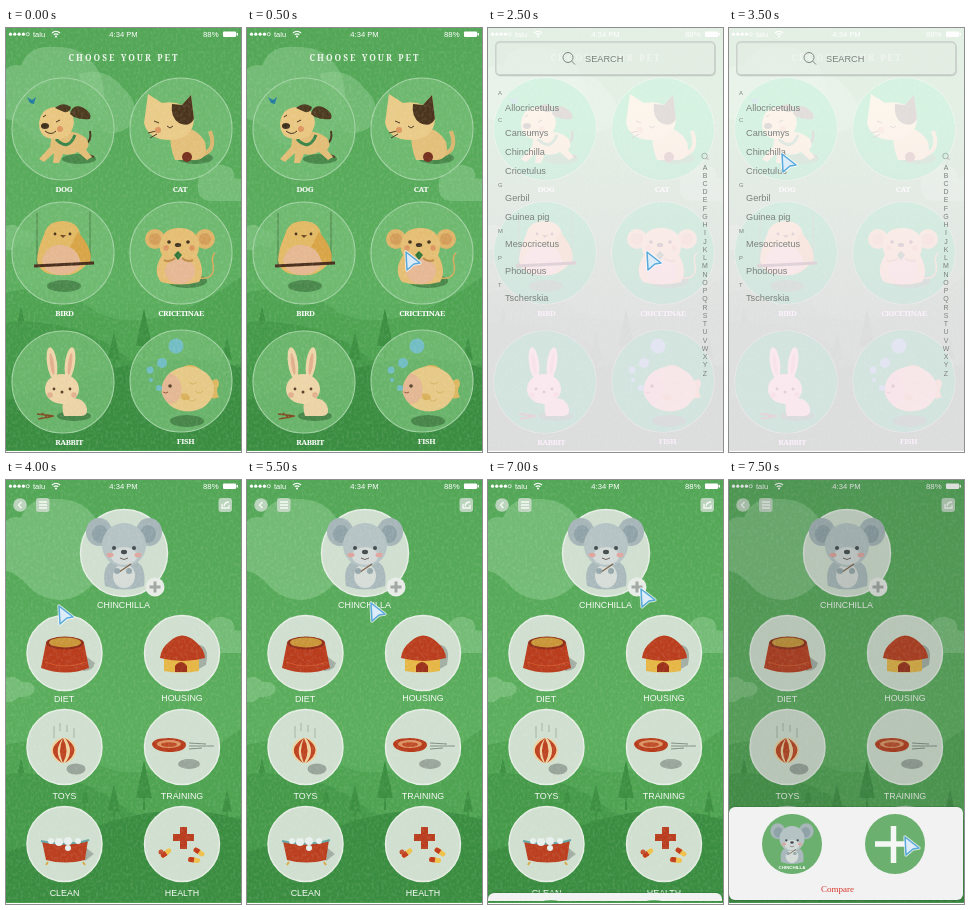
These frames come from a looping animation (235x424 px, 8000 ms). An HTML page:

```html
<!DOCTYPE html>
<html lang="en">
<head>
<meta charset="utf-8">
<title>Pet app</title>
<style>
html, body { margin: 0; width: 100%; height: 100%; overflow: hidden; background: #fff; }
svg { display: block; width: 100%; height: 100%; }
text { font-family: "Liberation Sans", sans-serif; }
.mid text, text.mid { text-anchor: middle; }
.slab text { font-family: "Noto Serif", serif; font-size: 7.8px; font-weight: 700; letter-spacing: -.4px; fill: #fff; }
.slab .title { font-size: 8.4px; letter-spacing: 2px; fill: #eef7ec; }
.caps text { font-size: 8.9px; fill: #f6faf5; }
.bubble { fill: #74bd75; fill-opacity: .8; stroke: #a3d3a4; stroke-width: 1.1; }
.tint { fill: #00b84a; }
.plate circle { fill: #d0dfcf; stroke: #e6eee5; stroke-width: 1.5; }
.shade ellipse { fill: #3a733b; opacity: .7; }

.pets, .care, .list, .tint, .sheet, .dim, .cursor { animation: 8s step-end infinite; }
.pets { animation-name: pets; }
.care { animation-name: care; }
.list { animation-name: list; }
.tint { animation-name: tint; }
.sheet { animation-name: sheet; }
.dim { animation-name: dim; }
.cursor { animation-name: cursor; }
@keyframes pets { 0% { visibility: visible } 50%, 100% { visibility: hidden } }
@keyframes care { 0% { visibility: hidden } 50%, 100% { visibility: visible } }
@keyframes tint { 0% { visibility: hidden } 12.5% { visibility: visible } 50%, 100% { visibility: hidden } }
@keyframes list {
  0% { visibility: hidden; transform: translateY(5px) }
  12.5% { visibility: visible; transform: translateY(5px) }
  31.25% { visibility: visible; transform: none }
  50%, 100% { visibility: hidden; transform: none }
}
@keyframes sheet {
  0% { visibility: hidden; transform: translateY(86px) }
  87.5% { visibility: visible; transform: translateY(86px) }
  93.75%, 100% { visibility: visible; transform: none }
}
@keyframes dim { 0% { visibility: hidden } 93.75%, 100% { visibility: visible } }
@keyframes cursor {
  0% { visibility: hidden; transform: translate(157px, 222px) }
  6.25% { visibility: visible; transform: translate(157px, 222px) }
  37.5% { visibility: visible; transform: translate(54px, 128px) }
  43.75% { visibility: visible; transform: translate(51px, 124px) }
  68.75% { visibility: visible; transform: translate(122px, 121px) }
  75% { visibility: visible; transform: translate(152px, 108px) }
  81.25% { visibility: visible; transform: translate(151px, 107px) }
  93.75%, 100% { visibility: visible; transform: translate(174px, 355px) }
}
</style>
</head>
<body>
<svg viewBox="0 0 235 424" preserveAspectRatio="none">
<defs>
  <linearGradient id="sky" x2="0" y2="1">
    <stop stop-color="#52a656"/><stop offset=".6" stop-color="#5bae5d"/><stop offset="1" stop-color="#4da353"/>
  </linearGradient>
  <linearGradient id="veil" x2="0" y2="1">
    <stop offset=".2" stop-color="#fffdff"/><stop offset=".7" stop-color="#fbecfb"/>
  </linearGradient>
  <filter id="grain" x="0" y="0" width="1" height="1">
    <feTurbulence type="fractalNoise" baseFrequency=".4 .3" numOctaves="2" seed="4"/>
    <feColorMatrix values="0 0 0 0 1  0 0 0 0 1  0 0 0 0 1  1.6 0 0 0 -.65"/>
  </filter>
  <clipPath id="screen"><rect width="235" height="422.500"/></clipPath>
  <path id="tree" d="M0 0L8 38H1V50H-1V38H-8Z"/>
  <g id="rings">
    <circle cx="57" cy="101" r="51"/><circle cx="175" cy="101" r="51"/>
    <circle cx="57" cy="225" r="51"/><circle cx="175" cy="225" r="51"/>
    <circle cx="57" cy="354" r="51"/><circle cx="175" cy="353" r="51"/>
  </g>
  <g id="lens" fill="none" stroke="#7d847f"><circle r="5"/><path d="M3.6 3.6L7 7"/></g>
  <g id="pill">
    <rect x="-6" y="-2.5" width="12" height="5" rx="2.5" fill="#efc04a"/>
    <path d="M0-2.5H-3.5A2.5 2.5 0 0 0-3.5 2.5H0Z" fill="#c03b1c"/>
  </g>
  <g id="chin">
    <path d="M-19 35Q-23 12-8 9H9Q23 13 20 35Q0 42-19 35Z" fill="#a9b9bb"/>
    <ellipse cy="25" rx="11" ry="12" fill="#d6dcd8"/>
    <ellipse cx="-25" cy="-19" rx="13" ry="14" fill="#a5b5b8"/>
    <ellipse cx="25" cy="-19" rx="13" ry="14" fill="#a5b5b8"/>
    <ellipse cx="-24" cy="-17" rx="8" ry="9" fill="#8fa2a7"/>
    <ellipse cx="24" cy="-17" rx="8" ry="9" fill="#8fa2a7"/>
    <ellipse cy="-6" rx="22" ry="22" fill="#b5c3c4"/>
    <ellipse cy="5" rx="13" ry="9" fill="#d3dad7"/>
    <g fill="#424a4d"><circle cx="-10" cy="-3" r="2"/><circle cx="10" cy="-3" r="2"/><ellipse cy="1" rx="3" ry="2.2"/></g>
    <g fill="#dfa49d"><ellipse cx="-14" cy="4" rx="3.5" ry="2.2"/><ellipse cx="14" cy="4" rx="3.5" ry="2.2"/></g>
    <path d="M-4 7Q0 10 4 7" fill="none" stroke="#6d6260"/>
    <path d="M-5 21L7 13" stroke="#7c6146" stroke-width="1.4"/>
    <circle cx="-7" cy="20" r="3" fill="#96a8ac"/><circle cx="5" cy="20" r="3" fill="#96a8ac"/>
  </g>
</defs>

<g clip-path="url(#screen)">
  <rect width="235" height="424" fill="url(#sky)"/>
  <g fill="#8ccb8e" opacity=".55">
    <path d="M0 41Q7 35 15 38Q22 16 50 19Q80 18 94 46Q108 90 78 112Q50 130 24 108Q10 92 0 91Z"/>
    <path d="M0 198Q10 195 15 202Q27 200 29 209Q27 218 13 217Q7 223 0 222Z"/>
    <path d="M192 159Q190 147 200 147Q207 133 220 138Q229 140 228 150L235 151V173H203Q191 171 192 159Z"/>
  </g>
  <path d="M0 265Q48 252 92 285Q150 310 235 249V424H0Z" fill="#4ea351"/>
  <path d="M0 294Q70 290 120 328T235 335V424H0Z" fill="#449948"/>
  <g fill="#3c8f41">
    <use href="#tree" x="138" y="280"/>
    <use href="#tree" transform="translate(108 303) scale(.75)"/>
    <use href="#tree" transform="translate(221 309) scale(.6)"/>
    <use href="#tree" transform="translate(15 278) scale(.4)"/>
    <use href="#tree" transform="translate(79 307) scale(.42)"/>
  </g>
  <path d="M0 372Q55 355 95 345Q170 319 235 340V424H0Z" fill="#3a8d40"/>

  <g class="pets">
    <path d="M72 46Q100 38 117 60Q137 77 123 99Q110 108 96 104Z" fill="#8ccb8e" opacity=".5"/>
    <use class="bubble" href="#rings"/>
    <use class="tint" href="#rings"/>
    <g class="shade">
      <ellipse cx="73" cy="131" rx="17" ry="5"/><ellipse cx="189" cy="130" rx="18" ry="6"/>
      <ellipse cx="58" cy="258" rx="17" ry="6"/><ellipse cx="181" cy="253" rx="20" ry="7"/>
      <ellipse cx="68" cy="388" rx="17" ry="5"/><ellipse cx="181" cy="393" rx="17" ry="6"/>
    </g>

    <!-- dog -->
    <path d="M79 116Q86 113 84 103M80 126l8 3" fill="none" stroke="#4b3a20" stroke-width="2"/>
    <path d="M46 106Q66 99 80 110Q85 117 80 122L86 129L81 132L72 124Q65 128 57 126L53 135H47L48 125L38 134L33 131L44 119Z" fill="#e2bd76"/>
    <path d="M50 111Q62 124 69 107" fill="none" stroke="#398549" stroke-width="3"/>
    <path d="M33 95Q35 79 51 79Q67 79 68 95Q65 112 49 111Q33 111 33 95Z" fill="#e9c781"/>
    <path d="M49 80Q57 73 65 79Q64 85 58 84ZM64 86Q66 76 76 79Q87 85 84 91Q75 92 68 89Z" fill="#4c3a1f"/>
    <ellipse cx="39" cy="98" rx="4" ry="3" fill="#3f301e"/>
    <path d="M39 103Q45 108 50 103M50 94l4-2M37 89l3-2" fill="none" stroke="#3f301e"/>
    <circle cx="54" cy="101" r="3" fill="#dd965f"/>
    <path d="M21 69l5 3 4-3-2 7-4-1Z" fill="#247c9f"/>

    <!-- cat -->
    <path d="M192 127Q212 125 204 103" fill="none" stroke="#dcb66f" stroke-width="4"/>
    <path d="M164 103Q188 94 199 114Q203 131 190 132H169Q164 121 164 103Z" fill="#e3bf79"/>
    <path d="M138 95L142 66L156 75Q168 73 176 77L185 67L188 91Q187 111 164 112Q142 112 138 95Z" fill="#eacb88"/>
    <path d="M166 76L176 77L185 67L188 91Q183 100 173 95Q164 89 166 76Z" fill="#4a341d"/>
    <path d="M148 93l5 2M161 98l3 2 3-2M150 103l-8 2M151 106l-7 4" fill="none" stroke="#4c3823"/>
    <circle cx="152" cy="102" r="3" fill="#dd965f"/>
    <circle cx="181" cy="129" r="5" fill="#76301e"/>

    <!-- bird -->
    <path d="M31 237V185M84 235V184" stroke="#477442" stroke-width=".8"/>
    <path d="M38 207Q41 193 57 193Q73 194 74 207Q90 229 80 237Q70 249 53 247Q33 247 31 232Q32 219 38 207Z" fill="#e2b964"/>
    <path d="M72 204Q88 222 84 235Q69 235 64 219Z" fill="#d8a445"/>
    <path d="M36 231Q42 215 57 217Q73 220 75 237Q68 247 53 247Q37 245 36 231Z" fill="#e5b891"/>
    <path d="M54 207h6l-3 3Z" fill="#6f4922"/>
    <circle cx="49" cy="206" r="1.4" fill="#4b3520"/><circle cx="64" cy="206" r="1.4" fill="#4b3520"/>
    <path d="M28 238L88 235" stroke="#4a2f1c" stroke-width="3"/>

    <!-- hamster -->
    <path d="M193 250Q210 252 207 236Q205 229 209 225" fill="none" stroke="#dba95f" stroke-width="1.500"/>
    <g fill="#dfb468"><circle cx="149" cy="211" r="10"/><circle cx="199" cy="211" r="10"/></g>
    <g fill="#d39d58"><circle cx="149" cy="211" r="6"/><circle cx="199" cy="211" r="6"/></g>
    <path d="M154 216Q156 200 173 200Q191 200 193 216Q193 224 191 227Q200 243 193 254Q173 259 155 254Q146 243 156 227Q153 222 154 216Z" fill="#e5be73"/>
    <ellipse cx="174" cy="243" rx="15" ry="13" fill="#e6b894"/>
    <g fill="#3f301e"><circle cx="163" cy="214" r="1.800"/><circle cx="182" cy="214" r="1.800"/><ellipse cx="172" cy="217" rx="3.200" ry="2"/></g>
    <g fill="#dd965f"><circle cx="160" cy="220" r="2.800"/><circle cx="186" cy="220" r="2.800"/></g>
    <path d="M172 223l4 4-4 5-4-5Z" fill="#2f7738"/>
    <path d="M158 232Q164 235 169 230M187 232Q181 235 176 230" fill="none" stroke="#c08f4b" stroke-width="2"/>

    <!-- rabbit -->
    <path d="M31 386L48 388L32 391M36 385l6 5" fill="none" stroke="#7f4d22" stroke-width="1.600"/>
    <path d="M58 370Q79 368 81 381Q82 388 75 388H58Q55 379 58 370Z" fill="#ecd3a6"/>
    <g fill="#eed5a8"><ellipse cx="46" cy="335" rx="5" ry="16" transform="rotate(-8 46 335)"/><ellipse cx="64" cy="335" rx="5" ry="16" transform="rotate(8 64 335)"/><ellipse cx="56" cy="361" rx="17" ry="15"/></g>
    <g fill="#e2b08d"><ellipse cx="46" cy="336" rx="2" ry="11" transform="rotate(-8 46 336)"/><ellipse cx="64" cy="336" rx="2" ry="11" transform="rotate(8 64 336)"/><circle cx="44" cy="367" r="2.800"/><circle cx="68" cy="367" r="2.800"/></g>
    <g fill="#5b432c"><circle cx="48" cy="361" r="1.400"/><circle cx="64" cy="361" r="1.400"/><circle cx="56" cy="364" r="1.500"/></g>

    <!-- fish -->
    <path d="M202 356Q213 346 213 357Q209 363 213 369Q206 373 201 366ZM174 341Q184 333 194 341Z" fill="#dcb760"/>
    <ellipse cx="182" cy="361" rx="26" ry="22.500" fill="#e6c986"/>
    <path d="M164 345Q178 350 175 368Q169 378 162 375Q148 362 164 345Z" fill="#e4b793"/>
    <path d="M183 354q4 4 8 0m-2 9q4 4 8 0m-15 8q4 4 8 0" fill="none" stroke="#d8b463"/>
    <path d="M175 366q8-2 9 5q-6 3-9-1" fill="#d9b05a"/>
    <circle cx="164" cy="358" r="1.800" fill="#513d28"/>
    <path d="M157 364q3 2 5 0" fill="none" stroke="#99573a"/>
    <g fill="#74bfd4" opacity=".85"><circle cx="170" cy="318" r="7.500"/><circle cx="156" cy="335" r="5"/><circle cx="144" cy="342" r="3.500"/><circle cx="153" cy="360" r="3"/><circle cx="145" cy="352" r="2"/></g>

    <g class="slab mid">
      <text class="title" x="118" y="33">CHOOSE YOUR PET</text>
      <text x="58" y="164">DOG</text><text x="174" y="164">CAT</text>
      <text x="58.500" y="288">BIRD</text><text x="175" y="288">CRICETINAE</text>
      <text x="63" y="417">RABBIT</text><text x="179.500" y="416">FISH</text>
    </g>
  </g>

  <g class="care">
    <g class="plate">
      <circle cx="118" cy="73" r="43.5"/>
      <circle cx="58.5" cy="173" r="37.5"/><circle cx="176" cy="173" r="37.5"/>
      <circle cx="58.5" cy="267" r="37.5"/><circle cx="176" cy="267" r="37.5"/>
      <circle cx="58.5" cy="364" r="37.5"/><circle cx="176" cy="364" r="37.5"/>
    </g>
    <use href="#chin" x="118" y="71"/>
    <circle cx="149" cy="107" r="9.5" fill="#e8ece7"/>
    <path d="M143.5 107h11M149 101.500v11" stroke="#a0a6a1" stroke-width="3"/>

    <g fill="#cddccd" opacity=".85"><circle cx="14" cy="25" r="6.8"/><rect x="30" y="18" width="13.500" height="14" rx="3"/><rect x="212.500" y="18" width="13.500" height="14" rx="3"/></g>
    <path d="M15.500 22l-3 3 3 3M33 22h8M33 25h8M33 28h8M216 24v4h7v-3M218 26q1-4 5-4" fill="none" stroke="#f8fbf7" stroke-width="1.3"/>

    <!-- bowl -->
    <path d="M74 172L89 183Q87 191 77 191Z" fill="#a2aea3"/>
    <path d="M40 163Q59 154 78 163L83 188Q60 197 35 188Z" fill="#b93c1c"/>
    <ellipse cx="59" cy="163" rx="19" ry="6.500" fill="#8f2c17"/>
    <ellipse cx="59" cy="162.500" rx="16" ry="5" fill="#c99537"/>
    <path d="M39 182Q59 190 80 182" fill="none" stroke="#d1572d"/>

    <!-- house -->
    <path d="M192 165Q204 165 200 185L191 190Z" fill="#a2aea3"/>
    <path d="M158 178H193V191Q176 194 158 191Z" fill="#e6b645"/>
    <path d="M154 178Q155 168 163 162Q176 149 190 162Q199 170 199 178Q177 184 154 178Z" fill="#ba3d1d"/>
    <path d="M169 192V186Q175 178 181 186V192Z" fill="#9c3019"/>

    <!-- ball -->
    <path d="M48 258V246M54 251V243M61 252V245M68 258V248" stroke="#9aa79c" stroke-width=".8"/>
    <ellipse cx="70" cy="289" rx="9.500" ry="5.500" fill="#98a49a"/>
    <circle cx="57.500" cy="270.500" r="12.500" fill="#eed2a0"/>
    <path d="M57 258Q37 270 56 283Q47 271 57 258ZM57 258Q51 271 57 283Q64 271 57 258ZM59 258Q78 270 59 283Q69 271 59 258Z" fill="#bd421f"/>

    <!-- disc -->
    <ellipse cx="183" cy="284" rx="11" ry="5" fill="#98a49a"/>
    <path d="M146 264Q147 258 163 258Q180 259 180 265Q179 272 163 272Q147 271 146 264Z" fill="#b73c1c"/>
    <ellipse cx="163" cy="264" rx="12" ry="4" fill="#dc9464"/>
    <ellipse cx="163" cy="264.500" rx="8" ry="2.300" fill="#bd4823"/>
    <path d="M183 263L200 264M183 266H208M183 269L196 268" stroke="#76847b" stroke-width=".9"/>

    <!-- tub -->
    <path d="M78 366L88 374L79 381Z" fill="#a2aea3"/>
    <path d="M36 361Q58 367 82 360L79 380Q59 385 40 380Z" fill="#bb3e1e"/>
    <path d="M35 361Q58 367 83 360" fill="none" stroke="#67a7a6" stroke-width="2"/>
    <g fill="#e7f0ec"><circle cx="45" cy="361" r="3"/><circle cx="53" cy="362" r="4"/><circle cx="62" cy="361" r="4"/><circle cx="72" cy="361" r="3"/><circle cx="62" cy="368" r="3"/></g>
    <path d="M42 382l-2 3M77 382l2 3" stroke="#d5a842" stroke-width="2"/>

    <!-- first aid -->
    <path d="M174 347h7v7h7v7h-7v8h-7v-8h-7v-7h7Z" fill="#b93d1e"/>
    <use href="#pill" transform="translate(160 373) rotate(-38)"/>
    <use href="#pill" transform="translate(193 372) rotate(34)"/>
    <use href="#pill" transform="translate(188 380) rotate(8)"/>
    <circle cx="155" cy="372" r="2.500" fill="#c24c29"/>

    <g class="caps mid">
      <text x="117.500" y="128">CHINCHILLA</text>
      <text x="58" y="221.500">DIET</text><text x="176" y="221">HOUSING</text>
      <text x="58.500" y="319">TOYS</text><text x="176" y="319">TRAINING</text>
      <text x="58.500" y="416">CLEAN</text><text x="176" y="416">HEALTH</text>
    </g>
  </g>

  <rect width="235" height="424" filter="url(#grain)" opacity=".16"/>

  <g fill="#fff">
    <g id="signal"></g>
    <text x="27" y="8.600" font-size="7.500">talu</text>
    <path d="M46 5Q50 1.500 54 5M47.700 6.800Q50 5 52.300 6.800" fill="none" stroke="#fff" stroke-width="1.100"/>
    <circle cx="50" cy="8.500" r="1"/>
    <text class="mid" x="117.500" y="8.800" font-size="7.600">4:34 PM</text>
    <text x="197" y="8.800" font-size="7.800">88%</text>
    <rect x="217" y="3.500" width="13" height="5.500" rx="1"/><rect x="230.500" y="5" width="1.500" height="2.500"/>
  </g>

  <g class="list" fill="#7b817d">
    <rect width="235" height="424" fill="url(#veil)" opacity=".84"/>
    <rect x="8" y="14.500" width="219" height="33" rx="4" fill="none" stroke="#c2c9c3" stroke-width="1.500"/>
    <rect x="7.500" y="13.500" width="219" height="33" rx="4" fill="#e3ebe3" fill-opacity=".5" stroke="#cbd1cc"/>
    <use href="#lens" x="80" y="29.500"/>
    <text x="97" y="33.500" font-size="9.200">SEARCH</text>
    <g id="names" font-size="9.200"></g>
    <g id="heads" font-size="5.800"></g>
    <use href="#lens" transform="translate(216.500 128) scale(.55)"/>
    <g id="index" class="mid" font-size="7"></g>
  </g>

  <rect class="dim" width="235" height="424" fill="#3a453d" opacity=".17"/>
</g>

<svg width="235" height="421" viewBox="0 0 235 421">
  <g class="sheet">
    <rect y="326" width="234" height="95" rx="6" fill="#2f6a38" opacity=".35"/>
    <rect y="327" width="234" height="93" rx="6" fill="#f1f2f1"/>
    <circle cx="63" cy="364" r="30" fill="#6cb070"/><circle cx="166" cy="364" r="30" fill="#6cb070"/>
    <use href="#chin" transform="translate(63 362) scale(.57)"/>
    <text class="mid" x="63" y="389" font-size="4.400" font-weight="700" fill="#fff">CHINCHILLA</text>
    <path d="M146 364h37M164.500 346v37" stroke="#f5f7f5" stroke-width="5.500"/>
    <text class="mid" x="108.500" y="412" font-size="9" fill="#d8372c" style="font-family:'Liberation Serif',serif">Compare</text>
  </g>
</svg>

<g class="cursor" stroke-linejoin="round">
  <path id="arrow" d="M2 2L16 13L10 14L3 20Z" fill="none" stroke="#fff" stroke-width="3.400" stroke-opacity=".7"/>
  <path d="M2 2L16 13L10 14L3 20Z" fill="#dcecf9" stroke="#58a9dc" stroke-width="1.500"/>
</g>
</svg>
<script>
const put = (id, markup) => document.getElementById(id).innerHTML = markup;
const label = (s, x, y) => `<text x="${x}" y="${y}">${s}</text>`;

const names = { Allocricetulus: 80, Cansumys: 105, Chinchilla: 124, Cricetulus: 143, Gerbil: 170,
  "Guinea pig": 189, Mesocricetus: 216, Phodopus: 243, Tscherskia: 270 };
const heads = { A: 65, C: 92, G: 157, M: 203, P: 230, T: 257 };
put("names", Object.entries(names).map(([s, y]) => label(s, 17, y + 3)).join(""));
put("heads", Object.entries(heads).map(([s, y]) => label(s, 10, y + 2)).join(""));
put("index", [..."ABCDEFGHIJKLMNOPQRSTUVWXYZ"].map((s, i) => label(s, 217, 141.5 + i * 8.24)).join(""));
put("signal", [0, 1, 2, 3, 4].map(i =>
  `<circle cx="${4.5 + i * 4.3}" cy="6.2" r="1.6" ${i > 3 ? 'fill="none" stroke="#fff" stroke-width=".7"' : ""}/>`).join(""));
</script>
</body>
</html>
```
